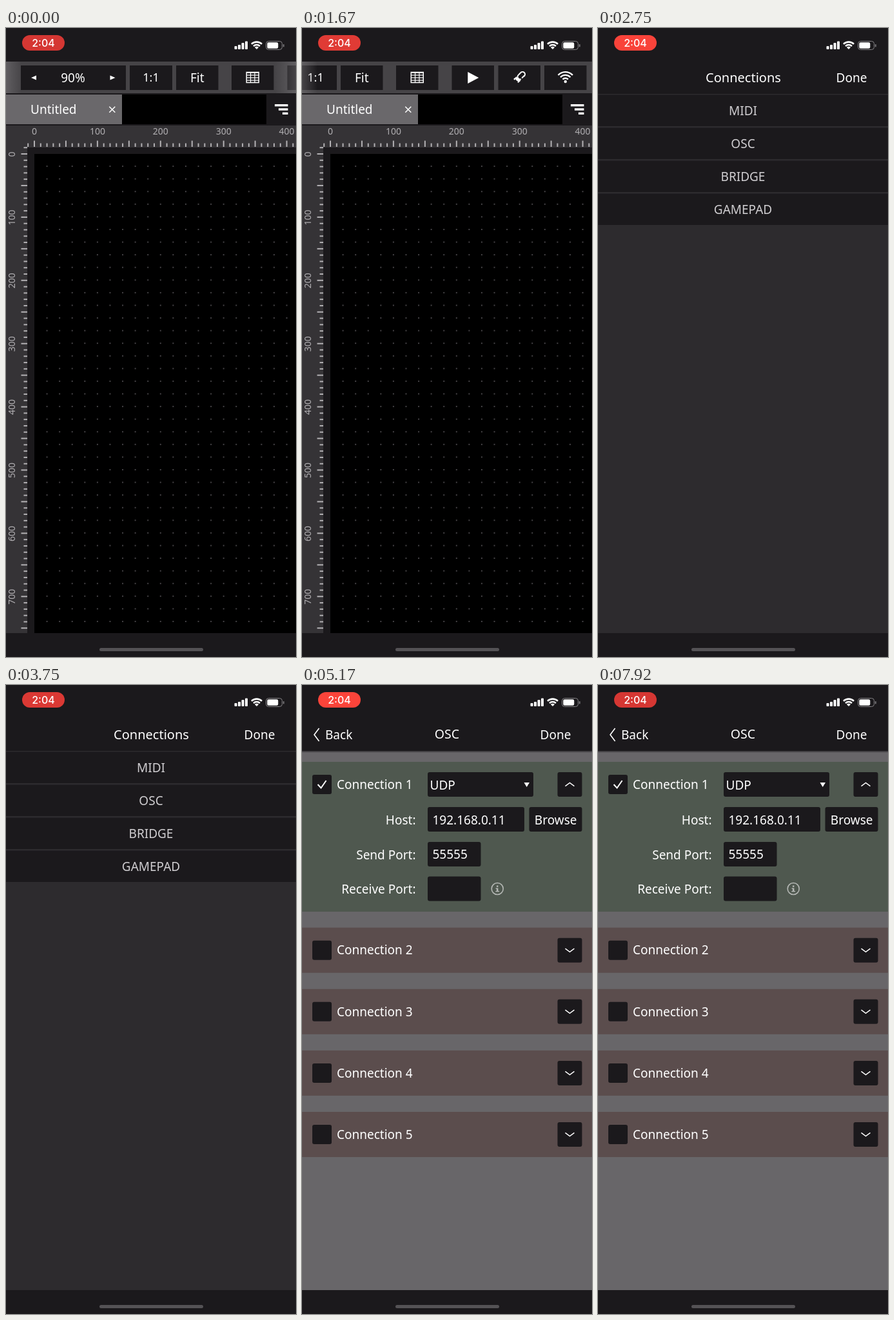
Animation of 450x974 px, one loop 8000 ms. Source, as an HTML page with a canvas:

```html
<!DOCTYPE html>
<html lang="en">
<head>
<meta charset="utf-8">
<title>Connection setup</title>
<style>
html, body { margin: 0; width: 100%; height: 100%; overflow: hidden; background: #1b191c; }
canvas { display: block; width: 450px; height: 974px; }
</style>
</head>
<body>
<canvas id="stage"></canvas>
<script>
const W = 450, H = 974, LOOP = 8000, STEP = 1000 / 12;
const DARK = '#1b191c', WHITE = '#fff', SOFT = '#cfcdd0', RULER = '#353336';
const SANS = '"Noto Sans", "Open Sans", sans-serif';
const canvas = document.getElementById('stage');
const dpr = window.devicePixelRatio || 1;
canvas.width = W * dpr;
canvas.height = H * dpr;
const c = canvas.getContext('2d');
c.scale(dpr, dpr);

function rect(x, y, w, h, color) {
  c.fillStyle = color;
  c.fillRect(x, y, w, h);
}

function round(x, y, w, h, r, color) {
  c.fillStyle = color;
  c.beginPath();
  c.roundRect(x, y, w, h, r);
  c.fill();
}

function poly(points, color) {
  c.fillStyle = color;
  c.beginPath();
  points.forEach(([x, y]) => c.lineTo(x, y));
  c.fill();
}

function line(points, color, width) {
  c.strokeStyle = color;
  c.lineWidth = width;
  c.beginPath();
  points.forEach(([x, y]) => c.lineTo(x, y));
  c.stroke();
}

function arc(x, y, r, from, to, color, width) {
  c.strokeStyle = color;
  c.lineWidth = width;
  c.beginPath();
  c.arc(x, y, r, from, to);
  c.stroke();
}

// y is the middle of the capital letters
function text(str, x, y, { size = 19, align = 'left', color = WHITE, weight = 400, font = SANS } = {}) {
  c.font = `${weight} ${size}px ${font}`;
  c.textAlign = align;
  c.fillStyle = color;
  c.fillText(str, x, y + size * 0.357);
}

function statusBar(t) {
  const glow = (1 - Math.cos(t / 2000 * Math.PI * 2)) / 2;
  const mix = (a, b) => Math.round(a + (b - a) * glow);
  round(25, 11, 66, 24, 12, `rgb(${mix(213, 255)},${mix(55, 69)},${mix(51, 59)})`);
  text('2:04', 58, 23, { size: 16, align: 'center', weight: 500, font: 'Inter, sans-serif' });

  [5, 7, 10, 12.5].forEach((h, i) => round(354.5 + i * 5.5, 33 - h, 4, h, 1, WHITE));

  const a = -Math.PI * 0.75, b = -Math.PI * 0.25;
  arc(389, 33, 11.4, a, b, WHITE, 2.6);
  arc(389, 33, 7, a, b, WHITE, 2.6);
  c.fillStyle = WHITE;
  c.beginPath();
  c.moveTo(389, 33);
  c.arc(389, 33, 4.3, a, b);
  c.fill();

  c.strokeStyle = '#858386';
  c.lineWidth = 1;
  c.beginPath();
  c.roundRect(403.5, 20.5, 25, 13, 4);
  c.stroke();
  round(405.3, 22.3, 17, 9.4, 2.3, WHITE);
  round(430, 25, 1.6, 4.5, 0.8, '#858386');
}

function homeBar() {
  rect(0, 937, W, 37, DARK);
  round(145, 960, 161, 5, 2.5, '#545255');
}

function tableIcon(x, color) {
  c.strokeStyle = color;
  c.lineWidth = 1.5;
  c.strokeRect(x - 9.5, 68.5, 19, 16);
  rect(x - 9.5, 68, 19, 2, color);
  for (const y of [73, 77, 81]) line([[x - 9.5, y], [x + 9.5, y]], color, 1.2);
  for (const d of [-3.2, 3.2]) line([[x + d, 69], [x + d, 84]], color, 1.2);
}

function playIcon(x, color) {
  poly([[x - 8, 68], [x + 9, 77], [x - 8, 86]], color);
}

function linkIcon(x, color) {
  c.save();
  c.translate(x, 76.7);
  c.rotate(-Math.PI / 4);
  c.strokeStyle = color;
  c.lineWidth = 2;
  for (const s of [-1, 1]) {
    c.beginPath();
    c.moveTo(s * 2.2, s * 3.4);
    c.lineTo(s * 7, s * 3.4);
    c.arc(s * 7, 0, 3.8, s * Math.PI / 2, -s * Math.PI / 2, s > 0);
    c.lineTo(s * 1.6, -s * 3.8);
    c.arc(s * 1.6, 0, 3.8, -s * Math.PI / 2, s * Math.PI * 0.62, s > 0);
    c.stroke();
  }
  c.restore();
}

function wifiIcon(x, color) {
  const a = -Math.PI * 0.76, b = -Math.PI * 0.24;
  for (const r of [5.8, 10.6, 15.4]) arc(x, 83.5, r, a, b, color, 2.4);
  c.fillStyle = color;
  c.beginPath();
  c.arc(x, 83, 2.2, 0, Math.PI * 2);
  c.fill();
}

const buttons = [
  [192, 66, x => text('1:1', x, 77, { align: 'center', size: 18 })],
  [264, 65.5, x => text('Fit', x, 77, { align: 'center' })],
  [350, 65.5, tableIcon],
  [436.5, 65.5, playIcon],
  [508.5, 65.5, linkIcon],
  [580, 65.5, wifiIcon]
];

function edgeShade(x, inner, alpha) {
  const g = c.createLinearGradient(x, 0, inner, 0);
  g.addColorStop(0, `rgba(135,133,136,${alpha})`);
  g.addColorStop(1, 'rgba(135,133,136,0)');
  rect(Math.min(x, inner), 52, Math.abs(inner - x), 49, g);
}

function toolbar(progress, pressed) {
  const shift = -204 * progress;
  rect(0, 52, W, 49, '#464447');
  c.save();
  c.translate(shift, 0);
  rect(23, 58, 163, 38, DARK);
  poly([[39, 77], [47, 73.5], [47, 80.5]], WHITE);
  poly([[169.5, 77], [161.5, 73.5], [161.5, 80.5]], WHITE);
  text('90%', 104, 77, { align: 'center' });
  for (const [x, w, draw] of buttons) {
    const on = pressed && draw === linkIcon;
    rect(x, 58, w, 38, on ? SOFT : DARK);
    draw(x + w / 2, on ? DARK : WHITE);
  }
  c.restore();
  edgeShade(0, 24, 0.4);
  edgeShade(W, W - 32, 0.4 * (1 - progress));
}

function tabs() {
  rect(0, 103, 180, 46, '#6a686b');
  rect(180, 103, 224, 46, '#000');
  text('Untitled', 38, 126);
  line([[160.3, 121.8], [169.3, 130.8]], WHITE, 1.5);
  line([[169.3, 121.8], [160.3, 130.8]], WHITE, 1.5);
  [[417, 118], [423, 124.3], [429, 130.6]].forEach(([x, y]) => rect(x, y, 437.5 - x, 3.4, WHITE));
}

function workspace() {
  const unit = 0.979, tick = '#b3b1b4';
  rect(0, 151, W, 786, RULER);
  rect(33, 185, W - 33, 752, DARK);
  rect(44, 195, W - 44, 742, '#000');

  for (let x = 1; x <= 20; x++)
    for (let y = 1; y <= 37; y++)
      rect(43 + x * 20 * unit, 194 + y * 20 * unit - 0.5, 2, 2, '#454346');

  const label = { size: 14, align: 'center', color: '#b0aeb1' };
  for (let n = -10; n <= 750; n += 10) {
    const len = n % 50 ? 5.5 : 9.5;
    const x = 44 + n * unit, y = 195 + n * unit;
    if (x < W) rect(x - 1, 184 - len, 2, len, tick);
    rect(33 - len, y - 1, len, 2, tick);
    if (n < 0 || n % 100) continue;
    if (x < W) text(n, x, 160.5, label);
    c.save();
    c.translate(9, y + 0.5);
    c.rotate(-Math.PI / 2);
    text(n, 0, 0, label);
    c.restore();
  }
}

function editor(progress, pressed) {
  toolbar(progress, pressed);
  tabs();
  workspace();
}

function connectionList() {
  rect(0, 102, W, 835, '#2d2b2e');
  text('Connections', 225.5, 76.5, { size: 20, align: 'center', weight: 500 });
  text('Done', 393.5, 77, { align: 'center' });
  ['MIDI', 'OSC', 'BRIDGE', 'GAMEPAD'].forEach((name, i) => {
    rect(0, 103.5 + i * 51, W, 48.5, DARK);
    text(name, 225, 128.3 + i * 51, { align: 'center', color: SOFT });
  });
}

function row(index, top) {
  const open = index === 0;
  rect(0, top, W, open ? 232 : 70, open ? '#4f584f' : '#5b4d4d');
  round(16, top + 20, 30, 30, 3, DARK);
  text('Connection ' + (index + 1), 54, top + 35);
  round(396.5, top + 16, 38, 38, 3, DARK);
  const d = open ? -2.6 : 2.6, y = top + 35;
  line([[408.5, y - d], [415.5, y + d], [422.5, y - d]], WHITE, 1.5);
  if (open) details(top);
}

function details(top) {
  const field = (x, y, w) => round(x, top + y, w, 38, 3, DARK);
  const label = (str, y) => text(str, 176.5, top + y, { align: 'right' });
  line([[24.5, top + 35], [29.5, top + 40.5], [37.5, top + 29]], WHITE, 2);
  field(195, 16, 164);
  text('UDP', 198.5, top + 36);
  poly([[344.5, top + 32], [353, top + 32], [348.7, top + 39]], WHITE);
  label('Host:', 90);
  field(195, 70, 150);
  text('192.168.0.11', 202.5, top + 90);
  field(352.5, 70, 82);
  text('Browse', 393.7, top + 90, { align: 'center' });
  label('Send Port:', 144);
  field(195, 124, 82.5);
  text('55555', 202.5, top + 143.5);
  label('Receive Port:', 197);
  field(195, 177.5, 82.5);

  const y = top + 196.5, grey = '#b5b8b5';
  arc(303.2, y, 9, 0, Math.PI * 2, grey, 1.6);
  rect(302, y - 5, 2.4, 2.4, grey);
  rect(302, y - 1, 2.4, 5, grey);
  rect(300.6, y - 1, 2, 1.4, grey);
  rect(300.3, y + 3.4, 5.8, 1.4, grey);
}

function oscScreen(settled) {
  rect(0, 102, W, 835, '#686669');
  const edge = c.createLinearGradient(0, 102, 0, 105);
  edge.addColorStop(0, 'rgba(27,25,28,.7)');
  edge.addColorStop(1, 'rgba(27,25,28,0)');
  rect(0, 102, W, 3, edge);
  line([[26.5, 67], [19, 77], [26.5, 87]], WHITE, 1.6);
  text('Back', 36, 77);
  text('OSC', 225, 76.5, { align: 'center', size: 19.5, weight: 500 });
  text('Done', 393.5, 77, { align: 'center' });
  for (let i = 0; i < 5; i++) {
    const spread = i ? 375.7 + (i - 1) * 95.1 : 119;
    row(i, settled ? spread : 119 + i * 41.3);
  }
}

function draw(now) {
  const step = Math.floor((now % LOOP + 5) / STEP) % 96;
  rect(0, 0, W, H, DARK);
  if (step < 33) {
    const p = Math.min(step / 7, 1);
    editor(p * p * (3 - 2 * p), step >= 31);
  } else if (step < 46) connectionList();
  else oscScreen(step > 46);
  homeBar();
  statusBar(step * STEP);
}

const start = performance.now();
function tick() {
  draw(performance.now() - start);
  requestAnimationFrame(tick);
}
tick();
</script>
</body>
</html>
```
